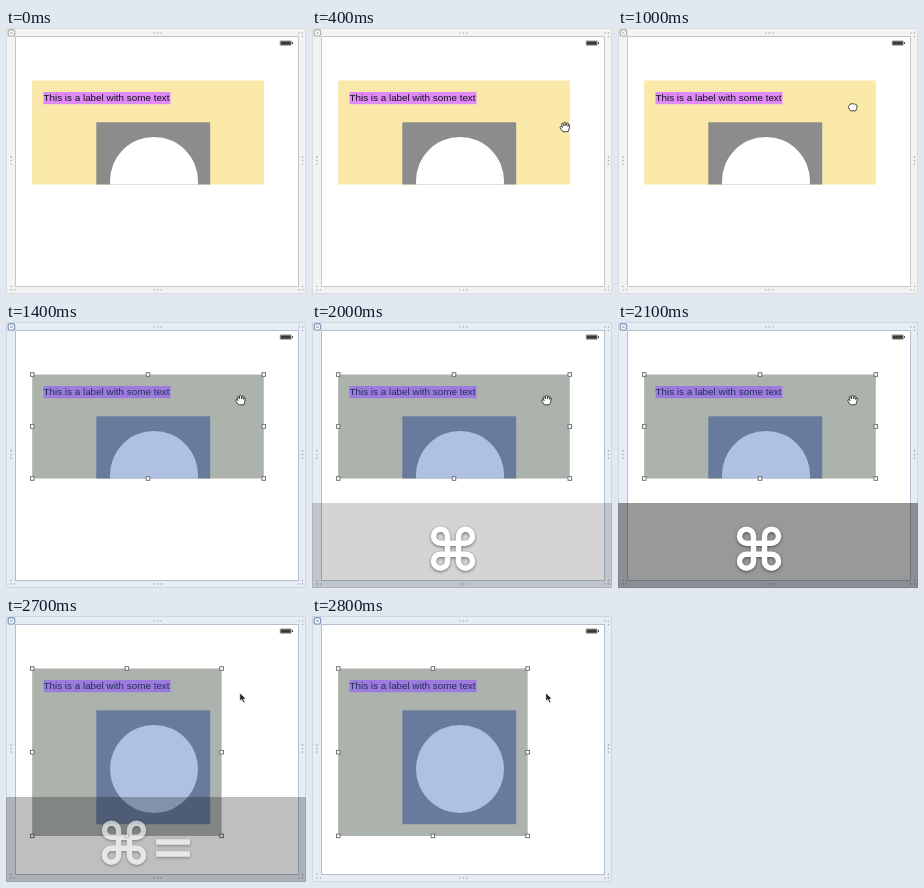
These frames come from a looping animation (300x266 px, 3000 ms). An HTML page:

```html
<!DOCTYPE html>
<html lang="en">
<head>
<meta charset="utf-8">
<style>
  html, body { margin: 0; height: 100%; overflow: hidden; background: #fff; }
  svg { display: block; width: 100vw; height: 100vh; --bar: #f3f3f3; --line: #c6c6c6; --dot: #b0b0b0; --knob: #b4b4b4; }
  svg.selected { --bar: #e7edf5; --line: #b4c0ce; --dot: #9dabbc; --knob: #8a9fbe; }
  .line { stroke: var(--line); }
  text { font: 9.87px "Liberation Sans", Arial, sans-serif; fill: #151018; }
  #handles rect { fill: #fff; stroke: #666; stroke-width: .9; }
  #keys { fill: none; stroke: #fff; stroke-width: 5.5; filter: drop-shadow(0 1px 1.5px rgba(0, 0, 0, .5)); }
</style>
</head>
<body>
<svg id="stage" viewBox="0 0 300 266" preserveAspectRatio="none">
  <defs>
    <clipPath id="bounds"><rect id="boundsRect" x="26.2" y="52.5"/></clipPath>
  </defs>

  <!-- Editor frame -->
  <rect width="300" height="266" fill="var(--bar)"/>
  <rect class="line" x=".5" y=".5" width="299" height="265" fill="none" opacity=".5"/>
  <rect class="line" x="9.5" y="8.5" width="283" height="250" fill="#fff"/>
  <g id="dots" fill="var(--dot)"></g>
  <rect x="2.2" y="1.7" width="6.4" height="6.4" rx="1.5" fill="#fff" stroke="var(--knob)" stroke-width="1.4"/>
  <path d="M4 3.5l2.8 2.8m0-2.8l-2.8 2.8" stroke="var(--knob)"/>

  <!-- Battery -->
  <rect x="274" y="12.8" width="11.4" height="4.6" rx=".7" fill="#aaa" stroke="#999" stroke-width=".6"/>
  <path d="M274.7 13.5h10v3.2h-10zM286 14.2h1v1.8h-1z" fill="#3a3a3a"/>

  <!-- Edited view -->
  <g clip-path="url(#bounds)">
    <rect width="300" height="266" fill="#f9e8a8"/>
    <rect x="37.5" y="64" width="127" height="12.2" fill="#e08af8"/>
    <text x="37.5" y="73.4">This is a label with some text</text>
    <rect x="90.3" y="94.3" width="113.9" height="113.9" fill="#8c8c8c"/>
    <circle cx="148" cy="153" r="44" fill="#fff"/>
    <rect id="tint" width="300" height="266" fill="rgb(50,96,181)" fill-opacity=".39"/>
  </g>
  <g id="handles"></g>

  <g id="pointer">
    <path id="arrow" d="M0 0V8.6L2 6.8L3.6 10.2L5.2 9.4L3.7 6.2H6.3Z" fill="#222" stroke="#fff" stroke-width=".7"/>
    <path id="openHand" d="M-2 5L-4.8 1Q-5-.6-3.2 0L-2.4.8L-3.4-2.6Q-2.8-4-1.8-3L-.9-.8L-1-4Q0-5.2.9-4L1.1-.9L1.8-3.6Q3-4.4 3.4-3L3.1-.4L3.8-1.8Q5-2.2 4.9-.8L4 2.8L3.2 5Z" fill="#fff" stroke="#333" stroke-width=".9" stroke-linejoin="round"/>
    <path id="closedHand" d="M-2 5L-4 2Q-4.4.4-3-.4Q-3-2-1.4-1.8Q-.2-2.8.8-1.8Q2.2-2.4 3-1.2Q4.8-1.2 4.6.6L4 3L3.2 5Z" fill="#fff" stroke="#333" stroke-width=".9"/>
  </g>

  <!-- Shortcut display -->
  <rect id="shade" y="181" width="300" height="85"/>
  <g id="keys">
    <path id="command" d="M-5.5-12.5V12.5a7 7 0 1 1-7-7H12.5a7 7 0 1 1-7 7V-12.5a7 7 0 1 1 7 7H-12.5a7 7 0 1 1 7-7Z"/>
    <path id="equals" d="M150 226h34M150 238h34"/>
  </g>
</svg>
<script>
const $ = id => document.getElementById(id);
const LOOP = 3000, STEP = 100;
const VIEW = { x: 26.2, y: 52.5 };
const FULL_SHADE = .4;

const show = (id, on) => $(id).setAttribute('visibility', on ? 'visible' : 'hidden');
const move = (id, x, y) => $(id).setAttribute('transform', `translate(${x} ${y})`);
const add = (parent, tag, attrs) => {
  const el = document.createElementNS('http://www.w3.org/2000/svg', tag);
  for (const key in attrs) el.setAttribute(key, attrs[key]);
  return $(parent).appendChild(el);
};

// Grips in the middle of each side and in the corners
const dot = (x, y) => add('dots', 'circle', { cx: x, cy: y, r: .8 });
for (const i of [-1, 0, 1]) {
  for (const y of [5, 262]) dot(151.5 + i * 3.6, y);
  for (const x of [5, 296.5]) dot(x, 132.5 + i * 3.6);
}
for (const [x, y, sx, sy] of [[5, 262, 1, -1], [296.5, 262, -1, -1], [296.5, 5, -1, 1]]) {
  dot(x, y); dot(x + 3.5 * sx, y); dot(x, y + 3.5 * sy);
}

const handles = [];
for (const v of [0, .5, 1]) for (const u of [0, .5, 1])
  if (u !== .5 || v !== .5) handles.push({ u, v, el: add('handles', 'rect', { width: 3.6, height: 3.6 }) });

function resizeView(w, h) {
  $('boundsRect').setAttribute('width', w);
  $('boundsRect').setAttribute('height', h);
  for (const { u, v, el } of handles) {
    el.setAttribute('x', VIEW.x + u * w - 1.8);
    el.setAttribute('y', VIEW.y + v * h - 1.8);
  }
}

function shadeOpacity(step) {
  if (step < 20 || step >= 28) return 0;
  return step === 20 ? .17 : step === 27 ? .25 : FULL_SHADE;
}

function draw(ms) {
  const step = Math.floor(ms / STEP);
  const selected = step >= 11;
  const fitted = step >= 23;

  $('stage').classList.toggle('selected', selected);
  show('tint', selected);
  show('handles', selected);
  if (fitted) resizeView(189.4, 167.4);
  else resizeView(231.6, 104);

  // The pointer glides in from the lower right and slows down
  const left = 1 - Math.min(1, Math.max(0, (step - 2) / 5));
  const x = 234.5 + 51 * left ** 2, y = 77.8 + 58 * left ** 2;
  const overView = x < 258 && !fitted;
  const pressed = step >= 10 && step < 13;
  const visible = step >= 2;
  move('pointer', fitted ? 233.8 : x, fitted ? 76.8 : y);
  show('arrow', visible && !overView);
  show('openHand', visible && overView && !pressed);
  show('closedHand', visible && overView && pressed);

  const shade = shadeOpacity(step);
  const chord = step >= 22;
  $('shade').setAttribute('opacity', shade);
  // Keys appear at once and fade out together with the shade
  $('keys').setAttribute('opacity', chord ? shade / FULL_SHADE : 1);
  show('command', shade > 0);
  show('equals', shade > 0 && chord);
  move('command', chord ? 118 : 141, 226.7);
}

const start = performance.now();
function tick() {
  draw((performance.now() - start) % LOOP);
  requestAnimationFrame(tick);
}
tick();
</script>
</body>
</html>
```
